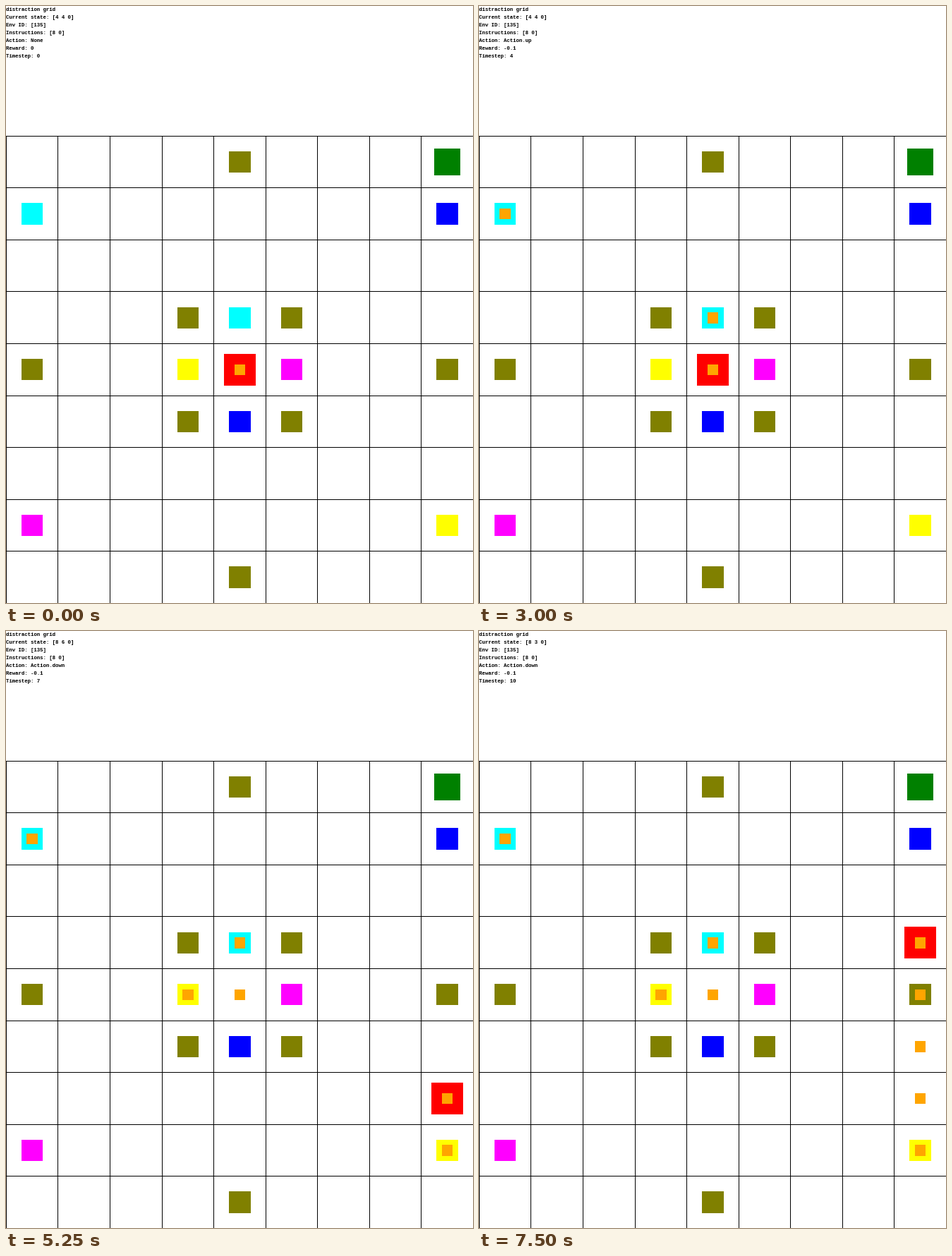
A matplotlib script for the animation above (8 s loop, 662 by 846 pixels).

```python
import math

import matplotlib.pyplot as plt
from matplotlib.animation import FuncAnimation
from matplotlib.patches import Rectangle

W, H, DPI = 662, 846, 64
CELL, TOP = 100, 250              # world units; the world is 900 x 1150
SX, SY = W / 900, H / 1150
TICK, TICKS_PER_STEP, TICKS = 250, 3, 32

STOPS = {
    "cyan": [(0, 1), (4, 3)],
    "blue": [(8, 1), (4, 5)],
    "yellow": [(3, 4), (8, 7)],
    "magenta": [(5, 4), (0, 7)],
    "olive": [(4, 0), (3, 3), (5, 3), (0, 4), (8, 4), (3, 5), (5, 5), (4, 8)],
}
GOAL = (8, 0)
START = (4, 4)
ACTIONS = ["down", "ride_bus", "ride_bus", "up", "left",
           "ride_bus", "down", "down", "down", "down"]
MOVES = {"down": (0, -1), "up": (0, 1), "left": (-1, 0), "right": (1, 0)}
ROUTES = {(4, 3): (0, 1), (0, 1): (4, 3), (3, 4): (8, 7), (8, 7): (3, 4)}
ALL_STOPS = {cell for cells in STOPS.values() for cell in cells}


def walk():
    path = [START]
    for action in ACTIONS:
        x, y = path[-1]
        if action == "ride_bus":
            path.append(ROUTES[x, y])
        else:
            dx, dy = MOVES[action]
            path.append((x + dx, y + dy))
    return path


def span(center, half, scale):
    """Pixel start and length of a square's side, snapped to whole pixels."""
    lo = math.floor((center - half) * scale + 0.43)
    hi = math.floor((center + half + 1) * scale + 0.57)
    return lo, hi - lo


def bounds(cell, half):
    x, w = span((cell[0] + 0.5) * CELL, half, SX)
    y, h = span(TOP + (cell[1] + 0.5) * CELL, half, SY)
    return x, y, w, h


def add_rect(x, y, w, h, color, z):
    rect = Rectangle((x, y), w, h, facecolor=color, linewidth=0,
                     antialiased=False, zorder=z)
    return ax.add_patch(rect)


def add_square(cell, half, color, z):
    return add_rect(*bounds(cell, half), color, z)


def info(step):
    x, y = PATH[step]
    at_stop = int((x, y) in ALL_STOPS)
    action = f"Action.{ACTIONS[step - 1]}" if step else "None"
    return [
        "distraction grid",
        f"Current state: [{x} {y} {at_stop}]",
        "Env ID: [135]",
        "Instructions: [8 0]",
        f"Action: {action}",
        f"Reward: {-0.1 if step else 0}",
        f"Timestep: {step}",
    ]


PATH = walk()

fig = plt.figure(figsize=(W / DPI, H / DPI), dpi=DPI, facecolor="white")
ax = fig.add_axes([0, 0, 1, 1])
ax.set_xlim(0, W)
ax.set_ylim(H, 0)
ax.axis("off")

for k in range(9):
    x = math.floor((k * CELL + 0.5) * SX)
    y = math.floor((TOP + k * CELL + 0.5) * SY)
    add_rect(x, 184, 1, H - 184, "black", 0)
    add_rect(0, y, W, 1, "black", 0)

for color, cells in STOPS.items():
    for cell in cells:
        add_square(cell, 20, color, 2)
add_square(GOAL, 25, "green", 2)

agent = add_square(START, 30, "red", 1)
trail = [add_square(cell, 10, "orange", 3) for cell in PATH]

# A monospace advance is 0.6 em; six world units per character.
font_px = 6 * SX / 0.6
lines = [
    ax.text(0, 7 + 11 * k, "", family="Liberation Mono", weight="bold",
            size=font_px * 72 / DPI, color="black", va="baseline",
            parse_math=False)
    for k in range(7)
]


def draw(tick):
    step = tick // TICKS_PER_STEP
    agent.set_bounds(*bounds(PATH[step], 30))
    for k, mark in enumerate(trail):
        mark.set_visible(k <= step)
    for line, text in zip(lines, info(step)):
        line.set_text(text)
    return [agent, *trail, *lines]


anim = FuncAnimation(fig, draw, frames=TICKS, interval=TICK,
                     repeat=True, repeat_delay=0, blit=False)
plt.show()
```
